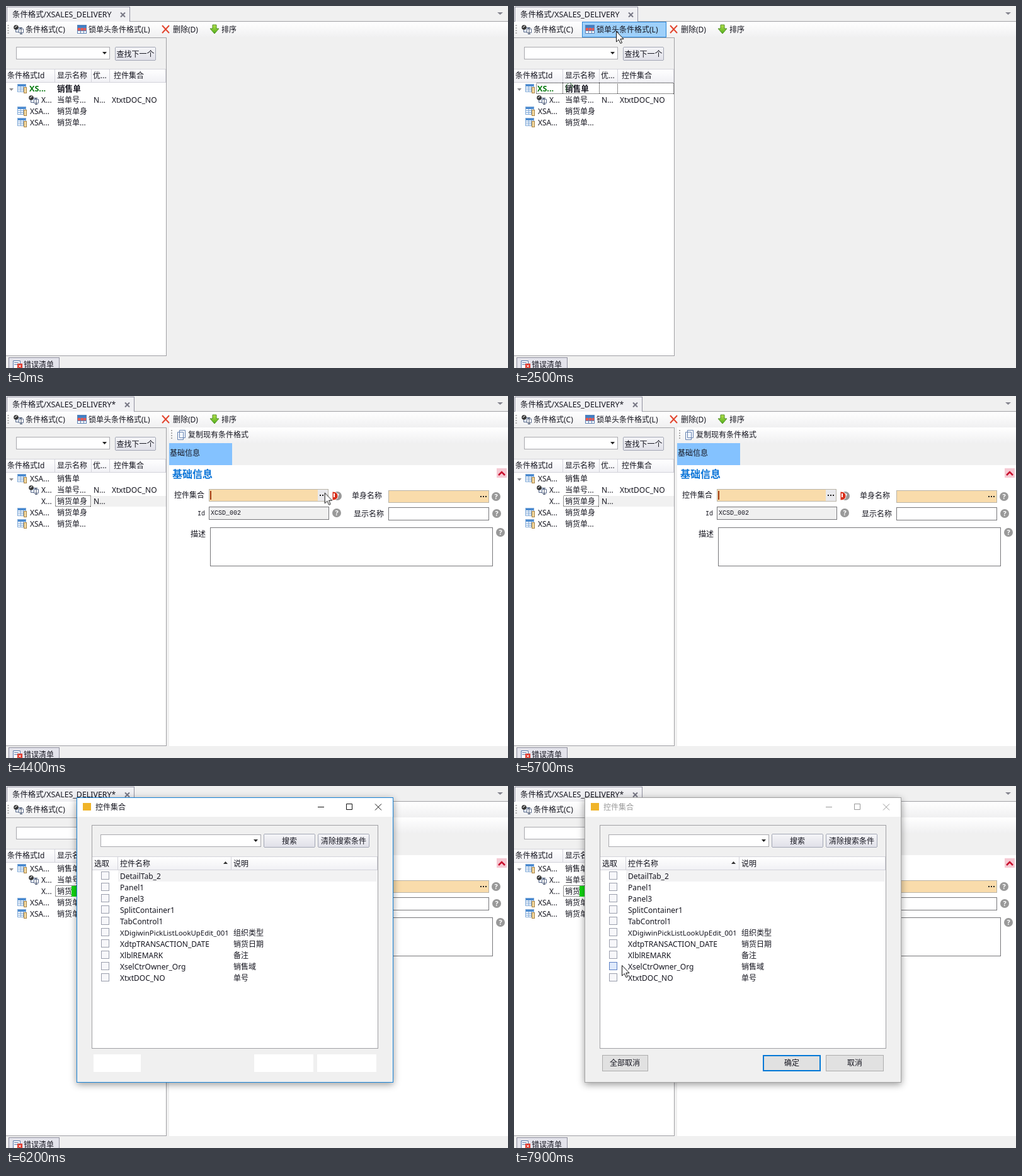
Write an HTML page that moves like this. It is 797x576 px and loops after 8 s.

```html
<!DOCTYPE html>
<html lang="zh-CN">
<head>
<meta charset="utf-8">
<title>条件格式</title>
<style>
html, body { margin: 0; width: 100%; height: 100%; overflow: hidden; background: #f0f0f0; }
svg { display: block; width: 797px; height: 576px; }
text { font: 12px "Noto Sans", "Noto Sans CJK SC", "Noto Sans CJK", sans-serif; fill: #15151f; white-space: pre; }
rect { shape-rendering: crispEdges; }
.tab { font-size: 12.4px; }
.bold { font-weight: bold; }
.mono { font: 10px "Liberation Mono", monospace; }
.head { font-size: 16px; font-weight: bold; fill: #0a74d8; }
.mid { text-anchor: middle; }
.line { fill: none; stroke: #a0a0a4; shape-rendering: crispEdges; }
.sep { fill: none; stroke: #d3d3da; shape-rendering: crispEdges; }
.dots { fill: none; stroke: #222; stroke-dasharray: 1 1; shape-rendering: crispEdges; }
.box { fill: #fff; stroke: #a9a9ae; }
.btn { fill: url(#face); stroke: #a3a7b5; }
.flat { fill: #e1e1e1; stroke: #adadad; }

.before, .after, .trail, .focus, .hot, .fresh, .edited, .open, .active, .ready, .hover { animation: 8s step-end infinite; }
.before { animation-name: before; }
.after { animation-name: after; }
.trail { animation-name: trail; }
.focus { animation-name: focus; }
.hot { animation-name: hot; }
.fresh { animation-name: fresh; }
.edited { animation-name: edited; }
.open { animation-name: open; }
.active { animation-name: active; }
.ready { animation-name: ready; }
.hover { animation-name: hover; }
@keyframes before { 0% { visibility: visible } 35%, 100% { visibility: hidden } }
@keyframes after { 0% { visibility: hidden } 35%, 100% { visibility: visible } }
@keyframes trail { 0% { visibility: hidden } 12.5% { visibility: visible } 35%, 100% { visibility: hidden } }
@keyframes focus { 0% { visibility: hidden } 15% { visibility: visible } 35%, 100% { visibility: hidden } }
@keyframes hot { 0% { visibility: hidden } 22.5% { visibility: visible } 35%, 100% { visibility: hidden } }
@keyframes fresh { 0% { visibility: hidden } 35% { visibility: visible } 55%, 100% { visibility: hidden } }
@keyframes edited { 0% { visibility: hidden } 55%, 100% { visibility: visible } }
@keyframes open { 0% { visibility: hidden } 73.75%, 100% { visibility: visible } }
@keyframes active { 0% { visibility: visible } 80%, 100% { visibility: hidden } }
@keyframes ready { 0% { visibility: hidden } 80%, 100% { visibility: visible } }
@keyframes hover { 0% { visibility: hidden } 98.75%, 100% { visibility: visible } }

#dialog { transform-origin: 363.5px 245px; animation: grow 8s infinite; filter: drop-shadow(0 3px 6px #0006); }
@keyframes grow {
  0%, 72.5% { opacity: 0; transform: scale(.93); animation-timing-function: steps(3); }
  76.25%, 100% { opacity: 1; transform: none; }
}

#pointer { animation: move 8s infinite, show 8s step-end infinite; }
@keyframes show {
  0% { visibility: hidden } 2.5% { visibility: visible }
  71.25% { visibility: hidden } 87.5%, 100% { visibility: visible }
}
@keyframes move {
  0%, 2.5% { transform: translate(568px, 41px); animation-timing-function: steps(3); }
  6.25% { transform: translate(370px, 75px); animation-timing-function: steps(5); }
  12.5% { transform: translate(82px, 133px); animation-timing-function: steps(3); }
  16.25% { transform: translate(86px, 129px); animation-timing-function: steps(3); }
  20% { transform: translate(140px, 70px); animation-timing-function: steps(3); }
  23.75%, 31.25% { transform: translate(162px, 40px); animation-timing-function: steps(3); }
  35% { transform: translate(190px, 46px); animation-timing-function: steps(4); }
  40% { transform: translate(358px, 97px); animation-timing-function: steps(1); }
  41.25% { transform: translate(405px, 134px); animation-timing-function: steps(3); }
  45% { transform: translate(475px, 148px); animation-timing-function: steps(6); }
  52.5% { transform: translate(515px, 155px); animation-timing-function: steps(3); }
  56.25%, 57.5% { transform: translate(501px, 153px); animation-timing-function: steps(3); }
  61.25%, 62.5% { transform: translate(497px, 158px); animation-timing-function: steps(2); }
  65%, 66.25% { transform: translate(493px, 161px); animation-timing-function: steps(4); }
  71.25% { transform: translate(625px, 171px); animation-timing-function: steps(1); }
  87.5% { transform: translate(779px, 178px); animation-timing-function: steps(4); }
  92.5% { transform: translate(400px, 285px); animation-timing-function: steps(3); }
  96.25% { transform: translate(186px, 300px); animation-timing-function: steps(1); }
  97.5% { transform: translate(176px, 285px); animation-timing-function: steps(1); }
  98.75%, 100% { transform: translate(171px, 285px); }
}
</style>
</head>
<body>
<svg viewBox="0 0 797 576">
<defs>
  <linearGradient id="bar" x2="0" y2="1"><stop stop-color="#fff"/><stop offset="1" stop-color="#f0f0f1"/></linearGradient>
  <linearGradient id="face" x2="0" y2="1"><stop stop-color="#f5f5f8"/><stop offset="1" stop-color="#e0e0e8"/></linearGradient>
  <linearGradient id="cap" x2="0" y2="1"><stop stop-color="#fff"/><stop offset="1" stop-color="#f1f1f5"/></linearGradient>
  <linearGradient id="leaf" x2="0" y2="1"><stop stop-color="#b5e04a"/><stop offset="1" stop-color="#4fae1c"/></linearGradient>
  <g id="table">
    <rect width="14" height="13" fill="#fff"/>
    <rect width="14" height="4" fill="#4a8ad0"/>
    <path d="M.5 .5H13.5V12.5H.5ZM5 4V12M9.5 4V12M0 6.5H14M0 9.5H14" class="line" style="stroke:#7da8d8"/>
    <rect x="10.500" y="5.500" width="4" height="9" fill="#f3d9a0" stroke="#a88345"/>
  </g>
  <g id="rule">
    <path d="M3.500 4.500H10.500V11.500H3.500Z" fill="#e6edf8" stroke="#5c6c8c"/>
    <circle cx="4" cy="4" r="3.800" fill="#333"/><path d="M2 4.500L5.500 1.500" stroke="#ccc" stroke-width="1.500"/>
    <path d="M8.500 6.500H15.500V12.500H8.500Z" fill="#fff" stroke="#5c6c8c"/>
    <path d="M10 4.500H14M12 4.500V14.500M10 14.500H14" fill="none" stroke="#3f4c66"/>
  </g>
  <g id="help">
    <circle r="7" fill="#999"/>
    <text y="4" class="mid bold" style="fill:#fff;font-size:11px">?</text>
  </g>
  <path id="more" d="M0 0h2v2h-2zM4 0h2v2h-2zM8 0h2v2h-2z" fill="#222"/>
  <path id="down" d="M0 0H7L3.500 4Z" fill="#222"/>
</defs>

<rect width="797" height="576" fill="#f0f0f0"/>
<path d="M780 10H789L784.500 14Z" fill="#85858f"/>
<path d="M0 24.500H797" class="line"/>
<g class="before">
  <path d="M1.500 25V1.500H196.500V25" class="line" style="fill:#f0f0f3;stroke:#9090a0"/>
  <text x="10" y="18" class="tab">条件格式/XSALES_DELIVERY</text>
  <path d="M182 10.500l7 7m0-7l-7 7" stroke="#777785" stroke-width="2"/>
</g>
<g class="after">
  <path d="M1.500 25V1.500H203.500V25" class="line" style="fill:#f0f0f3;stroke:#9090a0"/>
  <text x="10" y="18" class="tab">条件格式/XSALES_DELIVERY*</text>
  <path d="M189 10.500l7 7m0-7l-7 7" stroke="#777785" stroke-width="2"/>
</g>

<rect y="25" width="797" height="25" fill="url(#bar)"/>
<path d="M3.500 30V46" stroke="#aaa" stroke-width="2" stroke-dasharray="2 2"/>
<rect class="hot" x="108.500" y="25.500" width="133" height="24" fill="#9ed0fa" stroke="#2b86d6"/>
<use href="#rule" x="12" y="30"/>
<text x="31" y="42">条件格式(C)</text>
<g transform="translate(113 30)">
  <rect width="15" height="14" fill="#fff"/>
  <rect width="15" height="4" fill="#3f7fc8"/><rect y="5" width="15" height="5" fill="#f0574d"/>
  <path d="M.5 .5H14.500V13.500H.5ZM5.500 4V13M10.500 4V13M0 4.500H14M0 9.500H14" class="line" style="stroke:#5b82b4"/>
</g>
<text x="131" y="42">锁单头条件格式(L)</text>
<path d="M248 31l11 12M259 31l-11 12" stroke="#e2452f" stroke-width="2"/>
<text x="265" y="42">删除(D)</text>
<path d="M328 30h6v6h4l-7 8l-7-8h4z" fill="url(#leaf)" stroke="#4c8f22"/>
<text x="342" y="42">排序</text>

<path d="M0 50.500H254.500V556.500H0" class="line" style="fill:#f0f0f0"/>
<rect class="box" x="16.500" y="65.500" width="148" height="19"/>
<use href="#down" x="153" y="73"/>
<rect class="btn" x="173.500" y="65.500" width="64" height="21" rx="2"/>
<text x="205.500" y="81" class="mid">查找下一个</text>
<rect y="101" width="254" height="20" fill="url(#cap)"/>
<rect y="122" width="254" height="434" fill="#fff"/>
<path d="M0 100.500H254M0 121.500H254M77.500 101V121M135.500 101V121M164.500 101V121M253.500 101V121" class="sep"/>
<text x="2" y="115">条件格式Id</text><text x="81" y="115">显示名称</text>
<text x="138" y="115">优...</text><text x="171" y="115">控件集合</text>
<path d="M5 131H12L8.500 135Z" fill="#8b8b90"/>
<use href="#table" x="18" y="124"/>
<use href="#rule" x="36" y="142"/>
<text x="56" y="154">X...</text><text x="81" y="154">当单号...</text>
<text x="139" y="154">N...</text><text x="168" y="154">XtxtDOC_NO</text>

<g class="before">
  <text x="37" y="136" class="bold" style="fill:#087a10;font-size:12.6px">XS...</text>
  <text x="81" y="136" class="bold" style="font-size:12.6px">销售单</text>
  <use href="#table" x="18" y="160"/><text x="38" y="172">XSA...</text><text x="81" y="172">销货单身</text>
  <use href="#table" x="18" y="178"/><text x="38" y="190">XSA...</text><text x="81" y="190">销货单...</text>
</g>
<path class="trail" d="M83 136V126L87 122.500M89 122.500L94 127L89 131" fill="none" stroke="#2c6b35"/>
<path class="focus dots" d="M35.500 122.500H253.500V139.500H35.500ZM77.500 122V140M135.500 122V140M164.500 122V140"/>

<g class="after">
  <text x="38" y="136">XSA...</text><text x="81" y="136">销售单</text>
  <g class="fresh">
    <text x="53" y="172">A...</text>
    <text x="139" y="172" class="bold" style="fill:#0a5a10">N...</text>
  </g>
  <g class="edited">
    <rect x="136" y="159" width="118" height="17" fill="#f1f1f1"/>
    <text x="56" y="172">X...</text><text x="139" y="172">N...</text>
  </g>
  <text x="81" y="172">销货单身</text>
  <rect x="78.500" y="158.500" width="56" height="17" class="dots"/>
  <use href="#table" x="18" y="178"/><text x="38" y="190">XSA...</text><text x="81" y="190">销货单身</text>
  <use href="#table" x="18" y="196"/><text x="38" y="208">XSA...</text><text x="81" y="208">销货单...</text>
  <rect class="open" x="104" y="159" width="9" height="17" fill="#12d812"/>

  <rect x="259" y="50" width="538" height="25" fill="url(#bar)"/>
  <path d="M263 54V70" stroke="#aaa" stroke-width="2" stroke-dasharray="2 2"/>
  <path d="M275.500 54.500H284.500V66.500H275.500ZM272.500 57.500H281.500V69.500H272.500Z" fill="#f4f7fd" stroke="#6683b0"/>
  <text x="289" y="66">复制现有条件格式</text>
  <rect x="259" y="75" width="100" height="35" fill="#84c2ff"/>
  <text x="260" y="95">基础信息</text>
  <rect x="259" y="110" width="538" height="447" fill="#fff"/>
  <text x="264" y="130" class="head">基础信息</text>
  <rect x="779" y="115" width="16" height="15" fill="#f6c9d3"/>
  <path d="M782 126l5-5l5 5" fill="none" stroke="#c8102e" stroke-width="2.500"/>
  <text x="267" y="162">控件集合</text>
  <rect x="322.500" y="148.500" width="189" height="19" fill="#f9dcab" stroke="#b9b4a8"/>
  <use href="#help" x="526" y="159"/>
  <g class="edited">
    <rect x="495" y="149" width="16" height="18" fill="#e9e9ec"/>
    <rect x="324" y="151" width="2" height="14" fill="#a33b13"/>
    <path d="M518 152C524 152 527 155 527 159S524 166 518 166Z" fill="#d9301c" stroke="#fff"/>
    <rect x="520" y="155" width="2" height="6" fill="#fff"/>
  </g>
  <use href="#more" x="498" y="157"/>
  <text x="549" y="163">单身名称</text>
  <rect x="607.500" y="150.500" width="159" height="19" fill="#f9dcab" stroke="#b9b4a8"/>
  <use href="#more" x="753" y="159"/>
  <use href="#help" x="778" y="160"/>
  <text x="304" y="190" class="mono">Id</text>
  <rect x="322.500" y="176.500" width="190" height="20" fill="#f0f0f0" stroke="#77777a"/>
  <text x="325" y="189" class="mono">XCSD_002</text>
  <use href="#help" x="525" y="186"/>
  <text x="552" y="192">显示名称</text>
  <rect x="607.500" y="177.500" width="159" height="20" fill="#fff" stroke="#77777a"/>
  <use href="#help" x="779" y="187"/>
  <text x="293" y="224">描述</text>
  <rect x="324.500" y="209.500" width="448" height="61" fill="#fff" stroke="#77777a"/>
  <use href="#help" x="785" y="217"/>
</g>

<rect x="4.500" y="559.500" width="80" height="20" fill="#e3e3eb" stroke="#8d8d9c"/>
<path d="M11.500 564.500H22.500V577H11.500ZM13 567.500H20M13 570.500H18" fill="#fff" stroke="#5878a8"/>
<rect x="18" y="569" width="8" height="8" fill="#df382c"/>
<path d="M20 571l4 4m0-4l-4 4" stroke="#fff"/>
<text x="28" y="575">错误清单</text>

<g id="dialog">
  <rect x="112.500" y="18.500" width="502" height="453" fill="#f0f0f0" stroke="#a3a3a3"/>
  <rect x="113" y="19" width="501" height="30" fill="#fff"/>
  <rect x="122" y="27" width="13" height="12" fill="#f0b429"/>
  <g class="active">
    <rect x="112.500" y="18.500" width="502" height="453" fill="none" stroke="#1883d7"/>
    <text x="142" y="38">控件集合</text>
    <path d="M495 33.500H505M540.500 28.500H549.500V37.500H540.500ZM586 28.500l10 10m0-10l-10 10" fill="none" stroke="#111"/>
    <path d="M139 427h75v28h-75zM394 427h94v28h-94zM494 427h94v28h-94z" fill="#fff"/>
  </g>
  <g class="ready">
    <text x="142" y="38" style="fill:#999">控件集合</text>
    <path d="M495 33.500H505M540.500 28.500H549.500V37.500H540.500ZM586 28.500l10 10m0-10l-10 10" fill="none" stroke="#999"/>
    <rect class="flat" x="140.500" y="428.500" width="72" height="25"/><text x="176" y="445" class="mid">全部取消</text>
    <rect class="flat" x="396" y="429" width="90" height="24" style="stroke:#0078d7;stroke-width:2"/><text x="441" y="445" class="mid">确定</text>
    <rect class="flat" x="495.500" y="428.500" width="91" height="25"/><text x="541" y="445" class="mid">取消</text>
  </g>
  <rect x="136.500" y="62.500" width="454" height="355" class="line" style="fill:#f0f0f0"/>
  <rect class="box" x="150.500" y="77.500" width="254" height="19"/>
  <use href="#down" x="393" y="85"/>
  <rect class="btn" x="409.500" y="76.500" width="81" height="21" rx="2"/><text x="450" y="92" class="mid">搜索</text>
  <rect class="btn" x="495.500" y="76.500" width="81" height="21" rx="2"/><text x="536" y="92" class="mid">清除搜索条件</text>
  <rect x="137" y="113" width="453" height="20" fill="url(#cap)"/>
  <rect x="137" y="134" width="453" height="283" fill="#fff"/>
  <path d="M137 112.500H590M137 133.500H590M177.500 113V133M357.500 113V133M589.500 113V133" class="sep"/>
  <text x="140" y="128">选取</text><text x="181" y="128">控件名称</text><text x="361" y="128">说明</text>
  <path d="M345 124H352L348.500 120Z" fill="#333"/>
  <rect x="178" y="134" width="411" height="18" fill="#f2f2f3"/>
  <g id="rows"></g>
  <rect class="hover" x="151.500" y="280.500" width="12" height="12" fill="#dfeafc" stroke="#5c7fc4"/>
</g>

<path id="pointer" d="M.5 .5V17L4.300 13.500L7 19.500L9.500 18.500L6.900 12.500H12Z" fill="#fff" stroke="#111"/>
</svg>
<script>
const rows = [
  ["DetailTab_2"], ["Panel1"], ["Panel3"], ["SplitContainer1"], ["TabControl1"],
  ["XDigiwinPickListLookUpEdit_001", "组织类型"], ["XdtpTRANSACTION_DATE", "销货日期"],
  ["XlblREMARK", "备注"], ["XselCtrOwner_Org", "销售域"], ["XtxtDOC_NO", "单号"]
];
document.getElementById("rows").innerHTML = rows.map(([name, note = ""], i) => {
  const y = 148 + 18 * i;
  const size = name.length > 25 ? 11.4 : 12;
  return `<rect x="151.5" y="${y - 11.5}" width="12" height="12" fill="#f7f7fa" stroke="#9a9eac"/>
    <text x="181" y="${y}" style="font-size:${size}px">${name}</text><text x="361" y="${y}">${note}</text>`;
}).join("");
</script>
</body>
</html>
```
